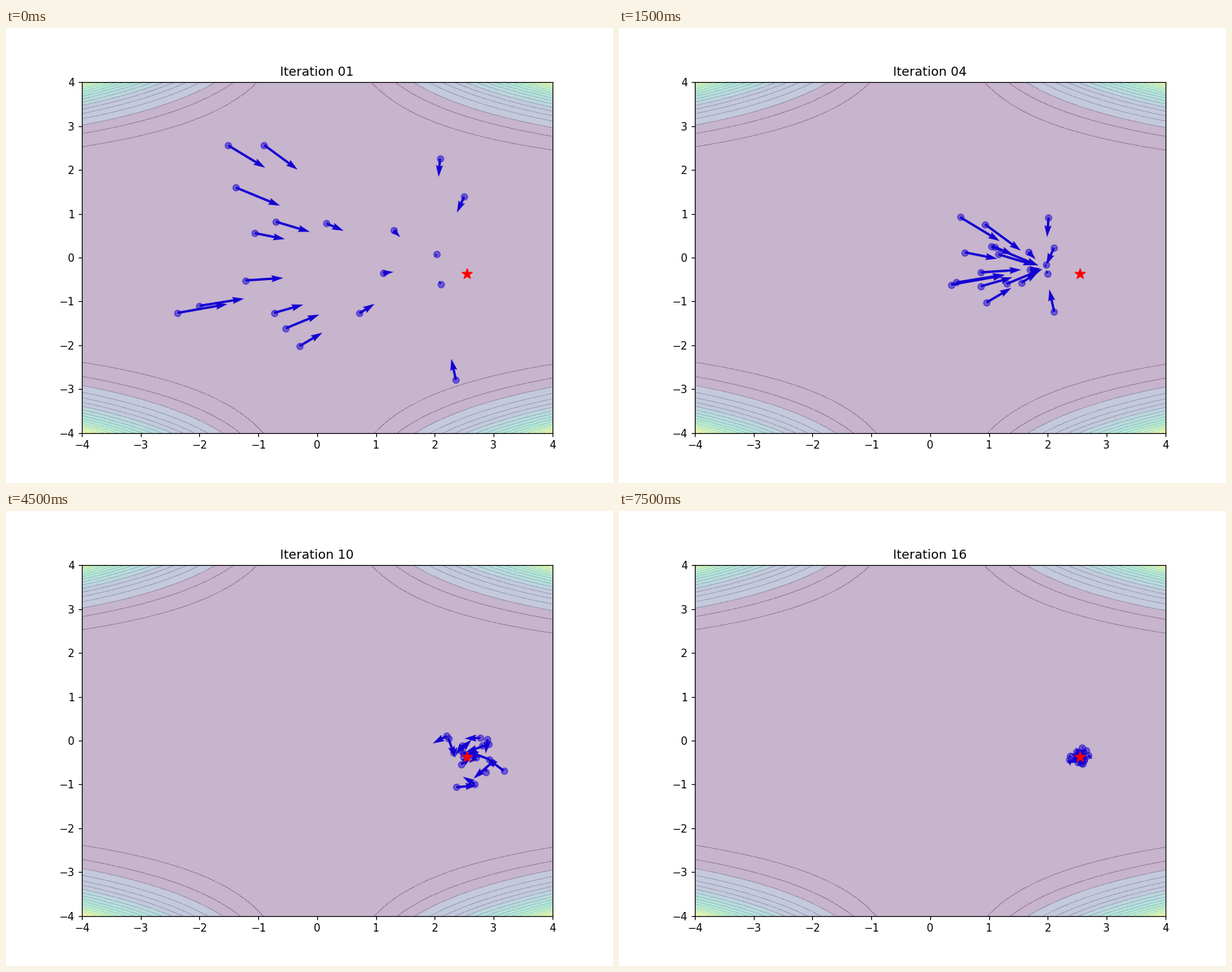
A matplotlib script that plays this animation: 864x648 px, repeating every 8000 ms.

```python
import numpy as np
import matplotlib.pyplot as plt
from matplotlib.animation import FuncAnimation

STEPS = 16
INK = "#1400d2"
HUB = np.array([1.95, -0.24])
BEST = np.array([2.55, -0.36])

# Where the swarm begins, ordered from the slowest particle to the fastest.
START = np.array([
    (0.16, 0.78), (2.09, 2.26), (-1.06, 0.56), (-0.30, -2.02), (1.30, 0.62),
    (-1.51, 2.56), (-0.73, -1.26), (2.36, -2.79), (-2.00, -1.10),
    (-2.37, -1.26), (-0.90, 2.57), (-1.22, -0.52), (2.10, -0.60),
    (0.72, -1.27), (1.12, -0.35), (-0.70, 0.82), (2.50, 1.39),
    (-1.38, 1.60), (-0.53, -1.61), (2.03, 0.08)])


def swarm():
    """Coast past the hub, brake, then jitter ever closer around the best."""
    rng = np.random.default_rng(12)
    speed = np.linspace(0.175, 0.25, len(START))[:, None]
    launch = speed * (HUB - START)
    pos, vel = START, 0.93 * launch
    states = [(pos, vel)]
    for step in range(1, STEPS):
        coast = np.interp(step, [5, 6, 7, 9], [1, 0.9, 0.25, 0])
        pull = np.interp(step, [4, 5, 8, 9], [0, 0.1, 0.15, 0.45])
        noise = np.interp(step, [4, 5, 7, 9, 11, 15],
                          [0, 0.06, 0.06, 0.12, 0.12, 0.07])
        vel = (coast * launch + pull * (BEST - pos)
               + rng.normal(0, noise, pos.shape))
        pos = pos + vel
        states.append((pos, vel))
    return states


def cost(x, y):
    return ((1.5 - x - x * y) ** 2 + (2.25 - x + x * y ** 2) ** 2
            + (2.625 - x + x * y ** 3) ** 2)


states = swarm()
fig, ax = plt.subplots(figsize=(8, 6), dpi=108)
fig.subplots_adjust(top=0.8805)

x, y = np.meshgrid(np.linspace(-4, 4, 200), np.linspace(-4, 4, 200))
levels = np.arange(0, 76001, 4000)
tone = np.linspace(0, 1, len(levels) - 1)
tone[:3], tone[3:7] = 0.02, 0.24
ax.contourf(x, y, cost(x, y), levels, colors=plt.cm.viridis(tone), alpha=0.3)

pos, vel = states[0]
dots = ax.scatter(*pos.T, color=INK, alpha=0.5)
arrows = ax.quiver(*pos.T, *vel.T, color=INK, width=0.005,
                   angles="xy", scale_units="xy", scale=1)
ax.scatter(*BEST, marker="*", s=100, color="red")
ax.set(xlim=(-4, 4), ylim=(-4, 4))
title = ax.set_title("")


def update(i):
    pos, vel = states[i]
    title.set_text(f"Iteration {i + 1:02d}")
    dots.set_offsets(pos)
    arrows.set_offsets(pos)
    arrows.XY = pos
    arrows.set_UVC(*vel.T)
    return title, dots, arrows


anim = FuncAnimation(fig, update, frames=STEPS, interval=500, repeat=True,
                     repeat_delay=0)
plt.show()
```
